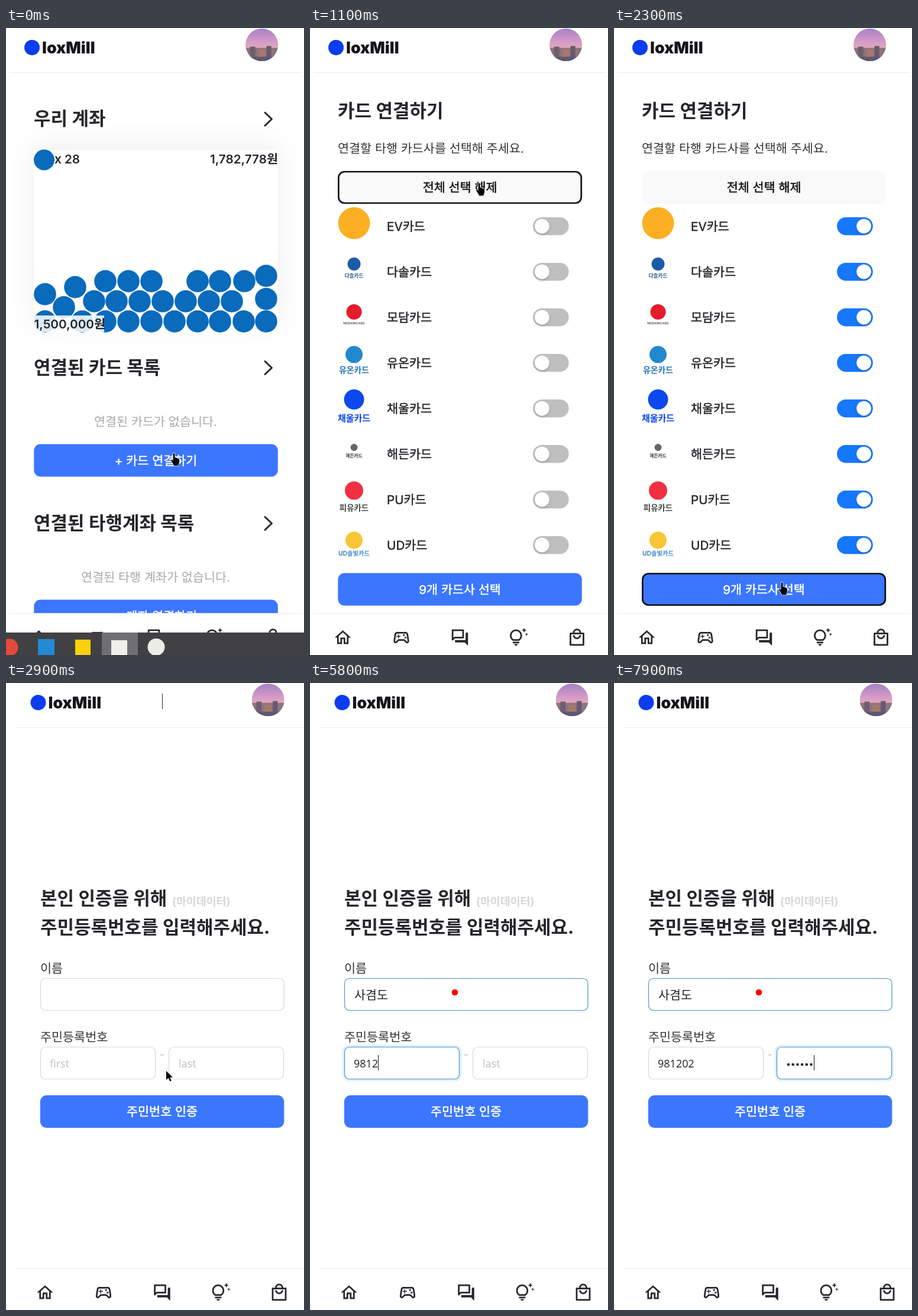
An HTML page with a canvas for the animation above (8000 ms loop, 504 by 1060 pixels).

```html
<!DOCTYPE html>
<html lang="ko">
<head>
<meta charset="utf-8">
<title>카드 연결하기</title>
<style>
html, body { margin: 0; width: 100%; height: 100%; overflow: hidden; background: #fff; }
canvas { display: block; width: 504px; height: 1060px; }
</style>
</head>
<body>
<canvas id="stage" width="504" height="1060"></canvas>
<script>
const ctx = document.getElementById('stage').getContext('2d');
const LOOP = 8000, STEP = 100;
const SANS = 'Inter, "Noto Sans CJK KR", "Noto Sans CJK", sans-serif';
const INPUT = '"Open Sans", "Noto Sans CJK KR", "Noto Sans CJK", sans-serif';
const INK = '#26272b', BLUE = '#3b76ff', BASE = 20.7, TITLE = 31;
const ZOOM = 1.375, WIDE = 300 * ZOOM, TALL = 40 * ZOOM;

// Moments of the story, in ms
const LIST_AT = 200, SELECT_AT = 1100, SUBMIT_AT = 2200, VERIFY_AT = 2500;
const NAME_AT = 3700, FIRST_AT = 4800, LAST_AT = 6500;

const clamp = v => Math.max(0, Math.min(1, v));
const ease = v => v * v * (3 - 2 * v);

function text(str, x, y, o = {}) {
  const { size = BASE, weight = 500, color = INK, align = 'left', family = SANS } = o;
  const medium = weight === 500;
  ctx.font = `${medium ? 400 : weight} ${size}px ${family}`;
  ctx.textAlign = align;
  ctx.fillStyle = ctx.strokeStyle = color;
  ctx.fillText(str, x, y + size * 0.37);
  // Hangul has no medium cut, so thicken the regular one
  if (medium) {
    ctx.lineWidth = 0.5;
    ctx.lineJoin = 'round';
    ctx.strokeText(str, x, y + size * 0.37);
  }
}
function title(str, x, y) { text(str, x, y, { size: TITLE, weight: 700 }); }

function circle(x, y, r, color) {
  ctx.fillStyle = color;
  ctx.beginPath();
  ctx.arc(x, y, r, 0, Math.PI * 2);
  ctx.fill();
}
function rect(x, y, w, h, color) {
  ctx.fillStyle = color;
  ctx.fillRect(x, y, w, h);
}
function round(x, y, w, h, r, fill, stroke, line = 1) {
  ctx.beginPath();
  ctx.roundRect(x, y, w, h, r);
  if (fill) { ctx.fillStyle = fill; ctx.fill(); }
  if (stroke) { ctx.strokeStyle = stroke; ctx.lineWidth = line; ctx.stroke(); }
}
function button(x, y, label, opt = {}) {
  const { fill = BLUE, color = '#fff', focus = false } = opt;
  round(x, y, WIDE, TALL, 11, fill);
  if (focus) round(x + 1, y + 1, WIDE - 2, TALL - 2, 10, null, '#101010', 2.7);
  text(label, x + WIDE / 2, y + TALL / 2, { color, align: 'center' });
}
function chevron(y) {
  ctx.strokeStyle = INK;
  ctx.lineWidth = 3;
  ctx.lineCap = ctx.lineJoin = 'round';
  ctx.beginPath();
  ctx.moveTo(438, y - 11);
  ctx.lineTo(449.5, y);
  ctx.lineTo(438, y + 11);
  ctx.stroke();
}

function avatar(x, y) {
  ctx.save();
  ctx.beginPath();
  ctx.arc(x, y, 27.5, 0, Math.PI * 2);
  ctx.clip();
  const sky = ctx.createLinearGradient(0, y - 27, 0, y + 10);
  sky.addColorStop(0, '#a583c4');
  sky.addColorStop(0.5, '#d096c8');
  sky.addColorStop(1, '#ecb0b4');
  rect(x - 28, y - 28, 56, 56, sky);
  rect(x - 28, y + 5, 56, 23, '#8f7280');
  rect(x - 20, y + 3, 9, 25, '#6d5f70');
  rect(x - 6, y + 8, 12, 20, '#a9796a');
  rect(x + 8, y + 2, 8, 26, '#655a6e');
  rect(x - 28, y + 20, 56, 8, '#5c5a70');
  ctx.restore();
}

function header(dx) {
  rect(6 + dx, 75, 495, 1, '#ebebeb');
  circle(44 + dx, 33, 13, '#0a3df2');
  text('loxMill', 61 + dx, 33, { size: 26.7, weight: 900, color: '#15161a' });
  avatar(432.7 + dx, 28.5);
}

// Icons on a 24-unit grid: outline, then solid parts
const ICONS = [
  ['', 'M12 5.69l5 4.5V18h-2v-6H9v6H7v-7.8zM12 3L2 12h3v8h6v-6h2v6h6v-8h3z'],
  ['M7.5 6h9a3 3 0 0 1 3 2.6l1.1 7.6a1.5 1.5 0 0 1-2.6 1.3L15.4 15H8.6L6 17.5a1.5 1.5 0 0 1-2.6-1.3l1.1-7.6A3 3 0 0 1 7.5 6z',
   'M9 8H8v2H6v1h2v2h1v-2h2v-1H9zM14 8h2v2h-2zM16 11h2v2h-2z'],
  ['M3 3h13v9H5.6L3 14.6z', 'M19 6h3v16l-4-4H6v-3h13z'],
  ['M5.5 15h7c1-.6 3-2.3 3-5.5a6.5 6.5 0 0 0-13 0c0 3.2 2 4.9 3 5.5zM5 18h8',
   'M7 20h4a2 2 0 0 1-4 0zM19 0l.9 2.1L22 3l-2.1.9L19 6l-.9-2.1L16 3l2.1-.9zM22 6l.6 1.4L24 8l-1.4.6L22 10l-.6-1.4L20 8l1.4-.6z'],
  ['M4 7h16v14H4zM8 6a4 4 0 0 1 8 0M8 9a4 4 0 0 0 8 0', '']
].map(pair => pair.map(d => new Path2D(d)));

function nav(dx) {
  rect(0, 989, 504, 71, '#fff');
  rect(6 + dx, 989, 495, 1, '#ebebeb');
  ICONS.forEach(([line, solid], i) => {
    ctx.save();
    ctx.translate(55.5 + 99 * i + dx, 1030.5);
    ctx.scale(ZOOM, ZOOM);
    ctx.translate(-12, -12);
    ctx.lineWidth = 2;
    ctx.lineCap = 'butt';
    ctx.lineJoin = 'round';
    ctx.strokeStyle = ctx.fillStyle = INK;
    ctx.stroke(line);
    ctx.fill(solid, 'evenodd');
    ctx.restore();
  });
}

// Rows of resting balls: y, then x positions
const BALLS = [
  [428, 168, 207, 246, 324, 362, 403],
  [462, 149, 187, 226, 265, 304, 343, 382],
  [496, 66, 129, 168, 207, 246, 285, 324, 362, 402, 440],
  [450, 66], [438, 117], [472, 98], [419, 440], [458, 440]
];

function home(t) {
  header(0);
  title('우리 계좌', 47, 153);
  chevron(154);

  ctx.save();
  ctx.shadowColor = 'rgba(70,80,90,.1)';
  ctx.shadowBlur = 42;
  ctx.shadowOffsetY = -8;
  rect(47, 206, 413, 298, '#fff');
  ctx.restore();
  rect(47, 206, 413, 310, '#fff');
  for (const [y, ...xs] of BALLS) xs.forEach(x => circle(x, y, 18.8, '#0a6abb'));
  circle(64.5, 223, 17.5, '#0a6abb');
  text('x 28', 82, 221, { weight: 600 });
  text('1,782,778원', 460, 221, { weight: 600, align: 'right' });
  rect(47, 486, 119, 28, 'rgba(255,255,255,.86)');
  text('1,500,000원', 47.5, 500, { weight: 600 });

  title('연결된 카드 목록', 47, 574);
  chevron(574.5);
  const note = { weight: 400, color: '#a8a8a8', align: 'center' };
  text('연결된 카드가 없습니다.', 253, 665, note);
  button(47.3, 703.5, '+ 카드 연결하기');
  title('연결된 타행계좌 목록', 47, 837);
  chevron(837.5);
  text('연결된 타행 계좌가 없습니다.', 253, 928, note);
  button(47.3, 966.5, '+ 계좌 연결하기');
  nav(0);
  if (t < 100) taskbar();
}

function taskbar() {
  rect(0, 1022, 504, 38, '#414144');
  rect(162, 1022, 61, 38, '#707074');
  circle(6, 1047, 14.5, '#e34a3b');
  rect(54, 1033, 28, 27, '#2489d3');
  rect(117, 1034, 26, 26, '#fdcf0d');
  rect(178, 1035, 27, 25, '#f2eee8');
  circle(254, 1046.5, 14.5, '#ecebe8');
}

// name, mark colour, mark y, mark radius, caption, caption y, caption size, caption colour
const CARDS = [
  ['EV카드', '#fbb023', 330, 27],
  ['다솔카드', '#1a5aa6', 399, 11, '다솔카드', 419, 8.7, '#2d5894'],
  ['모담카드', '#e41d2d', 480, 13, 'MODAMCARD', 499, 5.3, '#666'],
  ['유온카드', '#2288cf', 552, 14.5, '유온카드', 578, 13.8, '#2273b6'],
  ['채울카드', '#0b48ee', 628, 17, '채울카드', 659, 15, '#0b48ee'],
  ['해든카드', '#666', 709, 6, '해든카드', 723, 7.7, '#333'],
  ['PU카드', '#ef3040', 782, 15.5, '피유카드', 811, 13.4, '#444'],
  ['UD카드', '#fbc634', 866, 14.5, 'UD솔빛카드', 888, 10.3, '#3d8cc4']
];

function toggle(y, on) {
  const w = 44 * ZOOM, h = 22 * ZOOM;
  round(377.2, y - h / 2, w, h, h / 2, '#bfbfbf');
  ctx.globalAlpha = on;
  round(377.2, y - h / 2, w, h, h / 2, '#1677ff');
  ctx.globalAlpha = 1;
  ctx.save();
  ctx.shadowColor = 'rgba(0,35,11,.2)';
  ctx.shadowBlur = 4;
  ctx.shadowOffsetY = 2;
  circle(377.2 + h / 2 + (w - h) * on, y, 9 * ZOOM, '#fff');
  ctx.restore();
}

function list(t) {
  const picked = t >= SELECT_AT;
  const on = ease(clamp((t - SELECT_AT) / 200));
  header(0);
  title('카드 연결하기', 47, 140);
  text('연결할 타행 카드사를 선택해 주세요.', 47, 203, { weight: 400, color: '#333' });
  button(47.3, 242, picked ? '전체 선택 해제' : '전체 선택',
    { fill: '#f9f9f9', color: '#111', focus: picked && t < SUBMIT_AT });
  CARDS.forEach(([name, color, y, r, caption, cy, size, ink], i) => {
    const row = 335 + 77 * i;
    circle(74.5, y, r, color);
    if (caption) text(caption, 74.5, cy, { size, weight: 700, color: ink, align: 'center' });
    text(name, 130, row);
    toggle(row, on);
  });
  button(47.3, 921.5, `${picked ? 9 : 0}개 카드사 선택`, { focus: t >= SUBMIT_AT });
  nav(0);
  if (!picked && blink(t - LIST_AT)) rect(254, 18, 1, 26, '#222');
}

function blink(ms) { return ms % 1060 < 530; }

// Steps of typed text at a steady pace
const NAME_STEPS = ['', 'ㅅ', '사', '사ㄱ', '사겨', '사겸', '사겸', '사겸ㄷ', '사겸도'];
const typed = (t, start, pace, max) => Math.max(0, Math.min(max, Math.floor((t - start) / pace) + 1));

function field(x, y, w, focus, hover) {
  if (focus) round(x - 1, y - 1, w + 2, TALL + 2, 9, null, 'rgba(60,150,240,.14)', 5);
  round(x + 0.5, y + 0.5, w - 1, TALL - 1, 8, '#fff', focus || hover ? '#4596cf' : '#d9d9d9', 1.2);
}
function entry(str, x, y, size = 18, color = '#222', weight = 400) {
  text(str, x, y, { size, color, weight, family: INPUT });
  return x + ctx.measureText(str).width;
}
function caret(x, y, since) { if (blink(since)) rect(Math.round(x), y - 13, 1, 26, '#111'); }

function verify(t) {
  const inName = t >= NAME_AT && t < FIRST_AT;
  const inFirst = t >= FIRST_AT && t < LAST_AT;
  const inLast = t >= LAST_AT;
  header(10.5);
  title('본인 인증을 위해', 58, 364);
  text('(마이데이터)', 281, 369, { size: 18.4, weight: 700, color: '#d6d6d6' });
  title('주민등록번호를 입력해주세요.', 58, 413);

  const label = { weight: 400, color: '#333' };
  text('이름', 58, 482, label);
  field(58, 499, WIDE, inName, t >= 3300);
  const step = NAME_STEPS[Math.max(0, Math.min(8, (t - NAME_AT) / 100 | 0))];
  const end = entry(step, 75, 527, 20.6, '#222', 300);
  if (inName) {
    if (step && t < 4700) rect(end - 19, 539, 18, 1, '#222');
    caret(end, 527, t < 4500 ? 0 : t - 4500);
  }

  text('주민등록번호', 58, 598, label);
  field(58, 615, 195, inFirst);
  field(275, 615, 195, inLast);
  rect(261, 628, 6, 1.5, '#c8c8c8');

  const digits = '981202'.slice(0, typed(t, 5200, 200, 6));
  const firstEnd = digits ? entry(digits, 74, 643) : (entry('first', 74, 643, 18, '#bfbfbf'), 75);
  if (inFirst) caret(firstEnd, 642, t < 5200 ? t - FIRST_AT : t < 6200 ? 0 : t - 6200);

  const dots = typed(t, 6800, 200, 6);
  if (!dots) entry('last', 292, 643, 18, '#bfbfbf');
  for (let i = 0; i < dots; i++) circle(295 + 7.7 * i, 645, 2.3, '#222');
  if (inLast) caret(292 + 7.6 * dots, 642, dots ? 0 : t - LAST_AT);

  button(57.8, 697, '주민번호 인증');
  nav(10.5);
  if (t < NAME_AT && blink(t - VERIFY_AT)) rect(264, 18, 1, 26, '#222');
}

const ARROW = new Path2D('M0 0V15.5L3.6 12.2 6.2 17.8 8.8 16.6 6.2 11.2H11z');
const HAND = new Path2D('M-1.5 1.5a1.5 1.5 0 0 1 3 0V8c1.5-1 2.6-.4 2.8.7 1.2-.6 2.2-.1 2.4.9 1.2-.4 2.2.4 2.2 1.6V15c0 3-1.2 4-1.5 6.5H0c-.8-2.8-3-5.5-4.6-8-.6-1.6.9-2.8 2-1.7L-1.5 13z');

// time, x, y of the pointer tip
const PATH = [
  [0, 284, 718.5], [200, 284, 718.5], [500, 282, 723], [600, 282, 723],
  [1000, 286, 262], [1200, 286, 262], [1500, 284, 597], [1900, 284, 937],
  [2400, 284, 937], [2700, 284, 722], [3300, 245, 523], [LOOP, 245, 523]
];

function pointer(t) {
  const i = PATH.findIndex((p, n) => n && t < p[0]);
  const a = PATH[i - 1], b = PATH[i];
  const k = (t - a[0]) / (b[0] - a[0]);
  const x = a[1] + (b[1] - a[1]) * k, y = a[2] + (b[2] - a[2]) * k;
  if (t >= 3300) return circle(245, 523, 5.3, '#fb0007');
  const over = (top, bottom) => y > top && y < bottom;
  const hand = t < LIST_AT ? over(704, 758)
    : t < VERIFY_AT ? over(242, 297) || over(922, 976) : over(697, 752);
  const shape = hand ? HAND : ARROW;
  ctx.save();
  ctx.translate(x, y);
  ctx.lineJoin = 'round';
  ctx.strokeStyle = '#fff';
  ctx.lineWidth = 1.5;
  ctx.stroke(shape);
  ctx.fillStyle = '#080808';
  ctx.fill(shape);
  ctx.restore();
}

function draw(now) {
  const t = Math.floor((now % LOOP) / STEP) * STEP;
  rect(0, 0, 504, 1060, '#fff');
  (t < LIST_AT ? home : t < VERIFY_AT ? list : verify)(t);
  pointer(t);
}

const start = performance.now();
function tick() {
  draw(performance.now() - start);
  requestAnimationFrame(tick);
}
tick();
</script>
</body>
</html>
```
